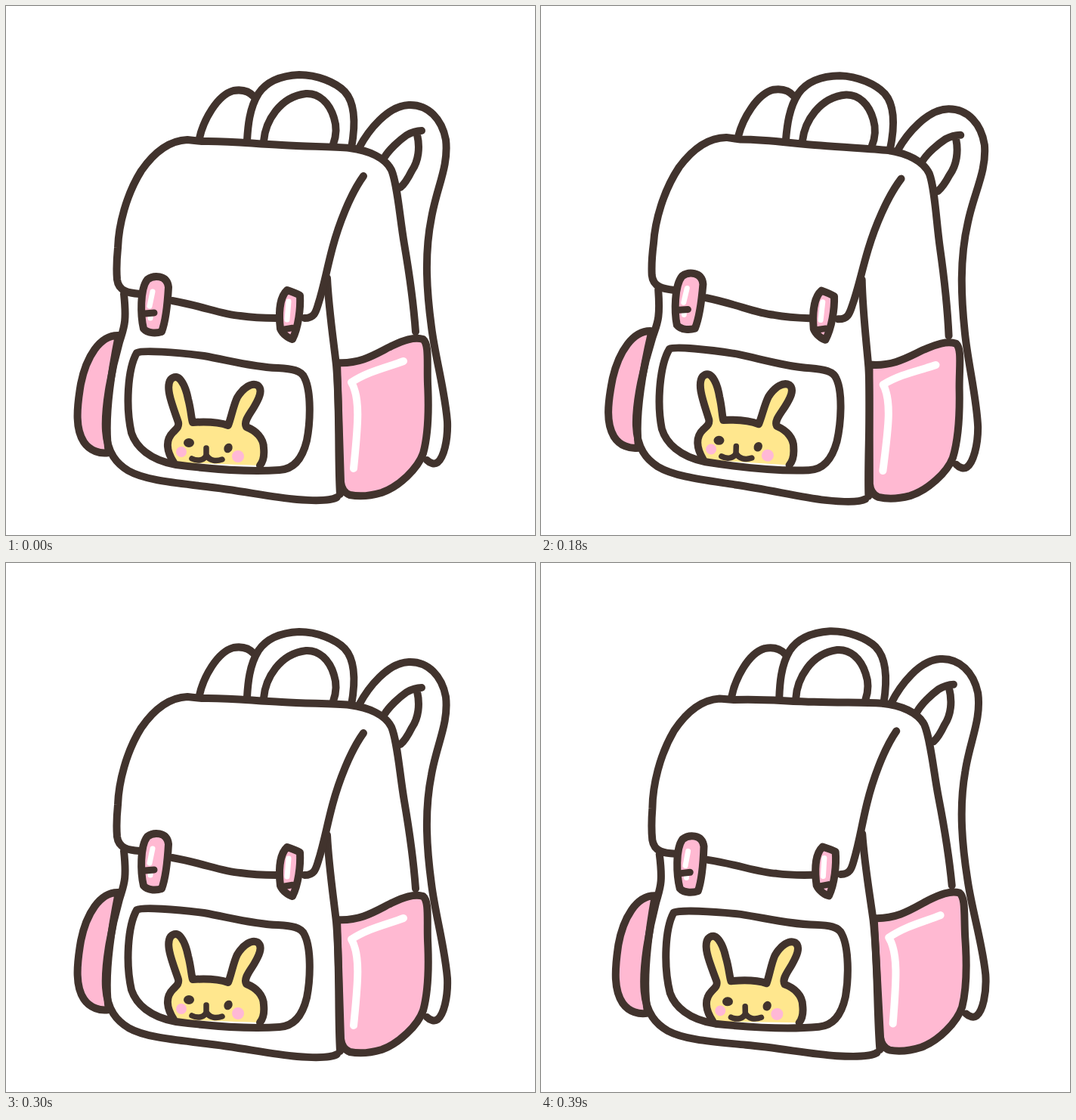
An HTML page that plays this animation: 700x700 px, repeating every 1.46 s.

```html
<!DOCTYPE html>
<html lang="en">
<head>
<meta charset="utf-8">
<title>Backpack</title>
<style>
  html, body { margin: 0; width: 100%; height: 100%; overflow: hidden; background: #fff; }
  svg { display: block; width: 100%; height: 100%; }
  #bag { fill: none; stroke: #41332d; stroke-width: 10; stroke-linecap: round; stroke-linejoin: round; }
  .pink { fill: #ffb9d2; }
  .yellow { fill: #ffe78e; }
  .shine { stroke: #fff; }
  .dot { fill: #41332d; stroke: none; }
  .cheek { fill: #ffb8d6; stroke: none; }
</style>
</head>
<body>
<svg viewBox="0 0 700 700">
  <g id="bag">
    <!-- straps and handle -->
    <path d="M256 175C261 152 279 118 301 112C313 110 322 113 328 120"/>
    <path d="M319 178C320 160 322 135 334 116C346 98 366 92 388 91C412 91 436 101 448 113C462 128 463 155 457 188"/>
    <path d="M341 179C343 153 362 120 397 116C414 115 428 128 434 148C438 160 437 172 433 183"/>
    <path d="M467 188C479 165 505 132 533 131C559 130 577 150 582 177C586 212 570 240 563 280C553 330 557 380 563 425C568 465 581 510 584 550C585 575 579 598 571 604C567 607 561 605 557 601"/>
    <path d="M501 200C507 190 520 178 530 171C537 167 544 165 550 165M544 170C548 187 546 205 537 218C533 226 528 235 522 240"/>

    <!-- side pockets -->
    <path class="pink" d="M149 436C124 435 106 465 99 500C93 535 92 560 103 577C111 589 125 593 136 591C131 560 134 510 149 436"/>
    <path class="pink" d="M438 472C470 474 490 460 510 450C525 443 540 437 552 441C560 448 557 470 558 500C560 540 558 570 552 592C545 612 520 636 497 644C480 649 465 649 455 647C447 644 444 638 443 630Z"/>
    <path class="shine" d="M526 470C505 478 480 483 457 498C470 520 465 560 460 612"/>

    <!-- body -->
    <path d="M156 381C160 420 156 425 150 445C140 480 130 530 132 562C134 592 147 606 162 615C185 628 225 631 265 636C310 641 350 650 385 653C410 655 430 655 438 650"/>
    <path d="M425 360C427 400 433 440 437 475C442 530 439 600 442 646"/>

    <!-- flap -->
    <path d="M177 381C163 380 149 378 147 362C146 350 146 340 148 320C149 290 159 250 179 218C195 195 215 178 240 177L259 179C300 178 330 183 365 184C400 186 430 186 455 188C480 191 502 201 510 217C518 236 521 280 527 315C533 350 539 390 542 431"/>
    <path d="M220 390C260 397 285 408 310 410C330 413 345 413 357 413M395 413C408 413 410 405 413 395C421 370 424 350 432 320C440 290 455 250 473 225"/>

    <!-- buckles -->
    <path class="pink" d="M187 362C177 375 178 410 182 427C188 434 200 433 206 431C212 415 214 390 215 372C213 355 195 356 187 362Z"/>
    <path class="shine" stroke-width="7" d="M194 378L190 397M191 411V413"/>
    <path stroke-width="9" d="M184 407L196 406"/>
    <path class="pink" d="M372 376C361 386 361 410 363 427C366 434 374 440 379 441C387 425 390 400 389 383C384 380 378 378 372 376Z"/>
    <path class="shine" stroke-width="7" d="M374 391L372 415"/>
    <path stroke-width="8.5" d="M367 428L379 426"/>

    <!-- rabbit -->
    <path class="yellow" d="M222 604C213 590 210 575 221 564C226 559 229 557 228 551C221 530 210 505 218 494C228 484 237 500 241 520C245 535 245 545 247 551C262 550 280 550 294 555C298 545 301 528 306 518C314 505 325 498 333 502C341 508 334 521 328 531C322 541 314 550 318 557C331 562 341 572 341 585C342 595 341 602 336 608"/>
    <circle class="cheek" cx="232" cy="590" r="7"/>
    <circle class="cheek" cx="307" cy="596" r="8"/>
    <ellipse class="dot" cx="242" cy="578" rx="7" ry="6"/>
    <ellipse class="dot" cx="294" cy="585" rx="5.5" ry="6.5" transform="rotate(25 294 585)"/>
    <path stroke-width="7.5" d="M246 599C254 603 263 601 265 594V585M265 594C269 602 278 603 286 600"/>

    <!-- window -->
    <path d="M173 459C180 455 225 458 262 463C300 470 330 478 360 479C378 480 391 482 395 492C404 510 403 550 398 575C392 600 380 613 362 614C320 617 272 613 225 607C190 601 172 583 166 565C158 530 161 480 173 459Z"/>
  </g>
</svg>
<script>
  const LOOP = 1460, STEP = 30, PEAK = 6, LAST = 13;
  const RIGHT = 1.65, LEFT = -1.25;
  const bag = document.getElementById('bag');
  const start = performance.now();

  // Swing right, swing back past the middle, then rest.
  function angleAt(ms) {
    const step = Math.min(LAST, Math.floor(ms / STEP));
    return step <= PEAK
      ? RIGHT * step / PEAK
      : RIGHT + (LEFT - RIGHT) * (step - PEAK) / (LAST - PEAK);
  }

  function draw(now) {
    const ms = Math.max(0, now - start) % LOOP;
    bag.setAttribute('transform', `rotate(${angleAt(ms)} 350 350)`);
    requestAnimationFrame(draw);
  }
  draw(start);
</script>
</body>
</html>
```
